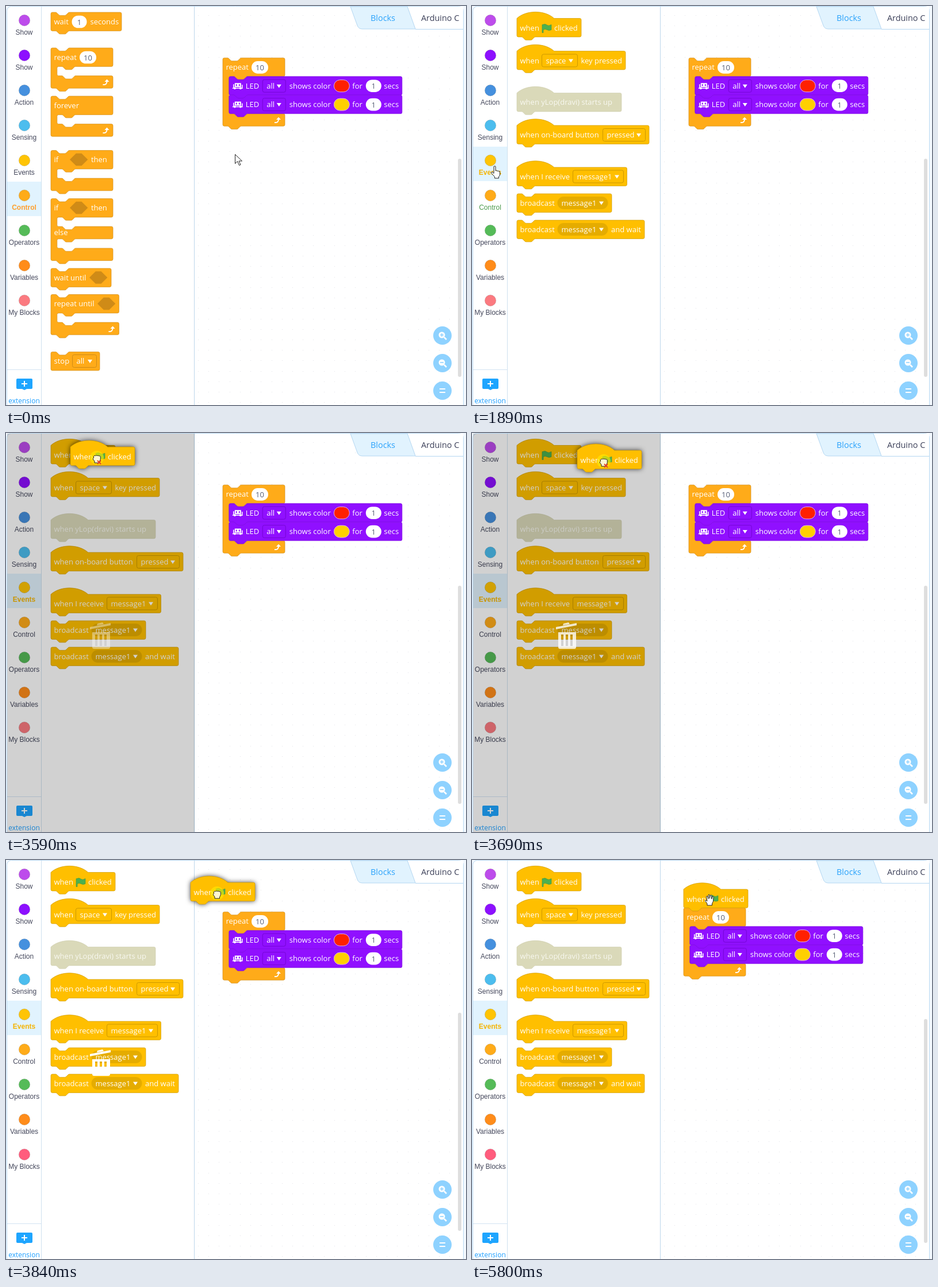
Write an HTML page with a canvas that moves like this. It is 800 px wide and 695 px high and loops after 6.88 s.

```html
<!DOCTYPE html>
<html lang="en">
<head>
<meta charset="utf-8">
<title>Block editor</title>
<style>
  html, body { margin: 0; width: 100%; height: 100%; overflow: hidden; background: #fff; }
  canvas { display: block; }
</style>
</head>
<body>
<canvas id="stage" width="800" height="695"></canvas>
<script>
const c = document.getElementById('stage').getContext('2d');
const LOOP = 6880, UNIT = 0.675;
const SANS = '"Open Sans", sans-serif', ARIAL = '"Liberation Sans", Arial, sans-serif';
const CONTROL = ['#ffab19', '#cf8b17'], EVENT = ['#ffbf00', '#cc9900'];
const SHOW = ['#9010ff', '#7a05e0'], OFF = ['#dad9b9', '#cfceb0'];

// ---------- basic helpers ----------
function text(s, x, y, color = '#fff', font = '13px ' + SANS, align = 'left') {
  c.font = font; c.textAlign = align; c.fillStyle = color;
  c.fillText(s, x, y);
}
function shape(d, x, y, fill, stroke, width = 1) {
  const p = new Path2D(d);
  c.save(); c.translate(x, y);
  if (fill) { c.fillStyle = fill; c.fill(p); }
  if (stroke) { c.strokeStyle = stroke; c.lineWidth = width; c.stroke(p); }
  c.restore();
}
function round(x, y, w, h, r, fill, stroke) {
  c.beginPath(); c.roundRect(x, y, w, h, r);
  if (fill) { c.fillStyle = fill; c.fill(); }
  if (stroke) { c.strokeStyle = stroke; c.lineWidth = 1; c.stroke(); }
}
function disc(x, y, r, fill, stroke) { round(x - r, y - r, 2 * r, 2 * r, r, fill, stroke); }
function line(color, ...p) { shape('M' + p.join(' '), 0, 0, null, color); }

// ---------- blocks ----------
const NOTCH = 'c2 0 3 1 4 2l4 4c1 1 2 2 4 2h12c2 0 3-1 4-2l4-4c1-1 2-2 4-2';
const TAB = 'c-2 0-3 1-4 2l-4 4c-1 1-2 2-4 2h-12c-2 0-3-1-4-2l-4-4c-1-1-2-2-4-2';

// mouths: list of [opening, arm] heights in block units
function block(x, y, width, [fill, stroke], { mouths = [], hat, last, shadow } = {}) {
  const w = width / UNIT, corner = `H${w - 4}a4 4 0 0 1 4 4`;
  let h = 48;
  let d = (hat ? 'M0 0c25-22 71-22 96 0' : 'M0 4a4 4 0 0 1 4-4h8' + NOTCH) + corner;
  for (const [gap, arm] of mouths) {
    d += `V${h - 4}a4 4 0 0 1-4 4H64${TAB}h-8a4 4 0 0 0-4 4V${h + gap - 4}a4 4 0 0 0 4 4h8${NOTCH}${corner}`;
    h += gap + arm;
  }
  d += `V${h - 4}a4 4 0 0 1-4 4${last ? '' : 'H48' + TAB}H4a4 4 0 0 1-4-4z`;
  c.save();
  c.translate(x, y); c.scale(UNIT, UNIT);
  const p = new Path2D(d);
  if (shadow) { c.shadowColor = 'rgba(0,0,0,.75)'; c.shadowBlur = 8; }
  c.fillStyle = fill; c.fill(p);
  c.shadowColor = 'transparent';
  if (stroke) { c.strokeStyle = stroke; c.lineWidth = 1; c.stroke(p); }
  c.restore();
}
function number(x, cy, w, s) {
  round(x, cy - 10.8, w, 21.6, 10.8, '#fff');
  text(s, x + w / 2, cy + 5, '#575e75', undefined, 'center');
}
function menu(x, cy, w, s, stroke, fill) {
  round(x + .5, cy - 11, w - 1, 22, fill ? 11 : 3, fill, fill ? null : stroke);
  text(s, x + 7.5, cy + 4.5);
  shape('M-4-2.5H4L0 3.5z', x + w - 12, cy, '#fff');
}
function hexagon(x, cy) { shape('M0 0L10.8-10.8H20.5L31.3 0 20.5 10.8H10.8z', x, cy, CONTROL[1]); }
function loopArrow(x, y) {
  shape('M-5 4Q2 5 2-2', x, y, null, '#fff', 2);
  shape('M-2-1L2-5.5 6-1z', x, y, '#fff');
}
function flag(x, y) {
  shape('M1 1Q5-1 8 1.5T16 1V10Q12 12 8.500 10T2 10V15H0V1z', x, y, '#4cb04f', '#45993d', .7);
}
function whenClicked(x, y, opts) {
  block(x, y, 112, EVENT, { hat: true, ...opts });
  text('when', x + 5.5, y + 21.5);
  flag(x + 44, y + 10);
  text('clicked', x + 65, y + 21.5);
}

function controlPalette() {
  const x = 78, C = [[24, 32]];
  block(x, 11, 123, CONTROL);
  text('wait', 83.5, 32); number(114.500, 27.5, 26, '1'); text('seconds', 146.5, 32);
  block(x, 73, 108, CONTROL, { mouths: C });
  text('repeat', 83.5, 94); number(128, 89.5, 29, '10'); loopArrow(173.5, 133);
  block(x, 157, 108, CONTROL, { mouths: C, last: true });
  text('forever', 83.5, 178); loopArrow(173.5, 217);
  block(x, 251.500, 108, CONTROL, { mouths: C });
  block(x, 335.500, 108, CONTROL, { mouths: [...C, ...C] });
  for (const y of [267.5, 351.5]) {
    text('if', 83.5, y + 4.5); hexagon(111, y); text('then', 148, y + 4.5);
  }
  text('else', 83.5, 399);
  block(x, 457, 105, CONTROL);
  text('wait until', 83.5, 478); hexagon(145, 473);
  block(x, 502.500, 118.5, CONTROL, { mouths: C });
  text('repeat until', 83.5, 523); hexagon(159, 518.5); loopArrow(183.5, 563);
  block(x, 602.500, 85, CONTROL, { last: true });
  text('stop', 83.5, 623); menu(115, 618.5, 43, 'all', CONTROL[1]);
}

function eventPalette() {
  const x = 78, hat = { hat: true };
  whenClicked(x, 21.5);
  block(x, 78.5, 189, EVENT, hat);
  text('when', 83.5, 100); menu(121, 95, 63, 'space', EVENT[1]); text('key pressed', 189.5, 100);
  block(x, 151.5, 182, OFF, hat);
  text('when yLop(dravi) starts up', 83.5, 172, '#f8f8f0');
  block(x, 208, 230, EVENT, hat);
  text('when on-board button', 83.5, 229); menu(227, 224.5, 75, 'pressed', EVENT[1]);
  block(x, 281, 191.5, EVENT, hat);
  text('when I receive', 83.5, 302); menu(175, 297, 89, 'message1', EVENT[1]);
  block(x, 327, 165, EVENT);
  block(x, 373, 222, EVENT);
  for (const y of [343, 389]) {
    text('broadcast', 83.5, y + 5); menu(148, y, 89, 'message1', '', '#e5ac00');
  }
  text('and wait', 242, 394);
}

function ledBlock(x, y, color) {
  const cy = y + 16.4;
  block(x, y, 301, SHOW);
  shape('M4-5H15V2H4zM6-3V0H8V-3zM11-3V0H13V-3z', x + 6, cy, '#fff');
  shape('M0 4H18M2-3V3M17-2V3', x + 6, cy, null, '#fff', 1.5);
  disc(x + 10, cy + 4, 2, '#fff'); disc(x + 20, cy + 4, 2, '#fff');
  text('LED', x + 29, cy + 4.5);
  menu(x + 58, cy, 41, 'all', '#7505d4');
  text('shows color', x + 105, cy + 4.5);
  round(x + 182.5, cy - 10.5, 27, 21, 10.5, color, '#dcb0f0');
  text('for', x + 214.5, cy + 4.5);
  number(x + 238, cy, 27, '1');
  text('secs', x + 269.500, cy + 4.5);
}
function repeatScript(x, y) {
  block(x, y, 108, CONTROL, { mouths: [[96, 32]] });
  text('repeat', x + 5.5, y + 21); number(x + 50, y + 16.5, 29, '10');
  loopArrow(x + 95, y + 108.5);
  ledBlock(x + 10.8, y + 32.4, '#ff2000');
  ledBlock(x + 10.8, y + 64.8, '#ffd000');
}

// ---------- surroundings ----------
const categories = [
  ['Show', '#bd4ceb'], ['Show', '#8d10ff'], ['Action', '#4590de'], ['Sensing', '#4cbdee'],
  ['Events', '#ffc404'], ['Control', '#ffab19'], ['Operators', '#55bb58'],
  ['Variables', '#ff8c1a'], ['My Blocks', '#fb7a80']];

function sidebar(t) {
  const selected = t < 1720 ? 5 : 4;
  c.fillStyle = '#e1f3fe'; c.fillRect(2, 1 + selected * 61, 59, 60);
  categories.forEach(([name, color], i) => {
    const y = 25 + i * 61, on = i === selected;
    disc(32, y, 9.7, i === 8 && t >= 3840 ? '#ff5c7d' : color, 'rgba(0,0,0,.12)');
    const hovered = i === 5 && t >= 1720 && t < 3590;
    const ink = on ? (i === 5 ? '#ff9f2e' : '#f5b400') : hovered ? '#4b9a4b' : '#45485c';
    text(name, 31.5, y + 25, ink, (on ? 'bold ' : '') + '12px ' + ARIAL, 'center');
  });
  line('#d3e3f2', 2, 633.5, 61, 633.5);
  shape('M2 0H26Q28 0 28 2V16Q28 18 26 18H18L14 20 10 18H2Q0 18 0 16V2Q0 0 2 0z', 18, 649, '#1ea5ff');
  shape('M27 658H37M32 653V663', 0, 0, null, '#fff', 2);
  text('extension', 31.5, 692, '#1e9fff', '12px ' + SANS, 'center');
}

function background() {
  c.fillStyle = '#f3f9ff'; c.fillRect(0, 0, 800, 695);
  round(1.5, .5, 794, 720, 8, '#fff', '#b9d9f2');
  c.fillStyle = '#e2e3e8';
  for (let x = 334; x < 784; x += 27 * UNIT)
    for (let y = 16; y < 695; y += 27 * UNIT) c.fillRect(Math.round(x), Math.round(y), 1, 1);
  line('#cfe0ee', 61.5, 1, 61.5, 695);
  line('#bcd6ea', 327.5, 1, 327.5, 695);
}

function controls(dropped) {
  shape('M698 1H795V40H712z', 0, 0, '#fff');
  shape('M599 1L611 34Q613 40 620 40H712L698 1z', 0, 0, '#e1f3fe', '#b4d7f2');
  line('#b4d7f2', 712, 40.5, 795, 40.5);
  text('Blocks', 655.5, 26, '#2ba3fb', '14.4px ' + SANS, 'center');
  text('Arduino C', 722, 26, '#3b3f58', '14.4px ' + SANS);
  round(786, dropped ? 277 : 266, 6, dropped ? 390 : 380, 3, '#dedede');
  for (const y of [574, 622, 670]) disc(759, y, 16, '#8ed2ff');
  for (const [y, sign] of [[573, 'M-3 0H3M0-3V3'], [621, 'M-3 0H3']]) {
    disc(758, y, 5.5, '#fff');
    shape('M4 4L8 8', 758, y, null, '#fff', 2.500);
    shape(sign, 758, y, null, '#8ed2ff', 1.6);
  }
  shape('M-5-3H5M-5 3H5', 759, 670, null, '#fff', 2.2);
}

function trash(alpha) {
  c.save(); c.globalAlpha = alpha;
  shape('M0 7L36 0V4L0 11zM12 4L13 1 22-1 24 2z', 146, 331, '#fff');
  const slits = [5, 13, 21].map(x => `M${x} 4V24H${x + 4}V4z`).join('');
  shape('M0 0H31V26Q31 29 28 29H3Q0 29 0 26z' + slits, 150, 347, '#fff');
  c.restore();
}

// ---------- pointer ----------
const cursors = {
  arrow: 'M.5.5V16.5l4-4 3 7 2.500-1-3-6.5h5.500z',
  pointer: 'M5 1.5q2-1.500 3 0V9q1.500-1 3 .5q1.500-1 2.500.5q2-.5 2 2V16q0 2-2 3v3H6.5v-2.500L1 13.5q-1-2.500 1.200-2.500L5 13.5z',
  open: 'M4 20V17L.8 12.5q-.5-2 1.200-1.500L4 12.5 2.500 5q.5-2 2.200-.5L6 8.500V2q1-2 2.300 0V8L9.500 2.500q1.500-1.500 2.200.3V9L13 4.800q1.800-1 2 .7L14.5 13 12.5 17v3z',
  closed: 'M4 19V16L1.500 13q-.8-2 1-2.500V7.500q1-2 3-.8q1-1.500 3-.2q1.500-1 3 .4q2-.8 2.800 1.200V13L12.500 16.500V19z'
};
function cursor(kind, x, y) {
  if (kind === 'closed') disc(x + 8, y + 10, 12, 'rgba(255,232,0,.65)');
  shape(cursors[kind], x, y, kind === 'closed' ? '#fff6cf' : '#fff', '#222');
}

// ---------- motion ----------
// Each leg: [first step time, last step time, steps, target x, target y]
const pointerPath = [
  [130, 130, 1, 340, 222], [220, 220, 1, 245, 215], [320, 320, 1, 160, 245], [410, 410, 1, 120, 277],
  [720, 1030, 5, 70, 284], [1110, 1350, 4, 33, 278],
  [2200, 2580, 6, 107, 78], [2650, 2800, 3, 106, 55], [2960, 3120, 3, 107, 31]];
const dragPath = [
  [3590, 3590, 1, 112, 13], [3690, 3690, 1, 183, 19], [3760, 3840, 2, 321, 28],
  [3910, 4230, 5, 349, 31], [4310, 4390, 2, 358, 30], [4630, 4630, 1, 359, 30],
  [4705, 4780, 2, 365, 36], [4960, 5170, 4, 366, 42], [5490, 5560, 2, 367, 39]];

function follow(t, x, y, legs) {
  for (const [from, to, n, tx, ty] of legs) {
    if (t < from) break;
    const k = n < 2 ? 1 : Math.min(n, 1 + Math.floor((t - from) / (to - from) * (n - 1) + 1e-6));
    x += (tx - x) * k / n;
    y += (ty - y) * k / n;
  }
  return [Math.round(x), Math.round(y)];
}

function draw(t) {
  const dragging = t >= 3590 && t < 5720, dropped = t >= 5720;
  const [bx, by] = follow(t, 78, 10, dragPath);
  const [px, py] = t < 3590 ? follow(t, 398, 258, pointerPath) : [bx + 38, by + 20];

  background();
  sidebar(t);
  const fresh = t < 1720 ? 0 : t < 1805 ? .35 : t < 1890 ? .7 : 1;
  c.globalAlpha = 1 - fresh; if (fresh < 1) controlPalette();
  c.globalAlpha = fresh; if (fresh) eventPalette();
  c.globalAlpha = 1;

  if (dragging && t < 3840) { c.fillStyle = 'rgba(0,0,0,.18)'; c.fillRect(2, 1, 326, 694); }
  if (dragging && t < 3910) trash(t < 3690 ? .4 : t < 3840 ? .8 : 1);

  if (dragging && t >= 4310) block(377, 58, 112, ['#c6c6c6'], { hat: true });
  if (dropped) { repeatScript(368, 83.4); whenClicked(368, 51); }
  else repeatScript(377, 90.4);
  controls(dropped);
  if (dragging) whenClicked(bx, by + 11.2, { shadow: true });

  const kind = dropped ? 'open' : t >= 3360 ? 'closed' : px < 61 ? 'pointer' : t >= 2200 ? 'open' : 'arrow';
  cursor(kind, px, py);
  if (dragging && px < 328) shape('M-3-3L3 3M3-3L-3 3', px + 12, py + 18, null, '#e0402a', 2);
}

const start = performance.now();
function tick() {
  draw((performance.now() - start) % LOOP);
  requestAnimationFrame(tick);
}
tick();
</script>
</body>
</html>
```
